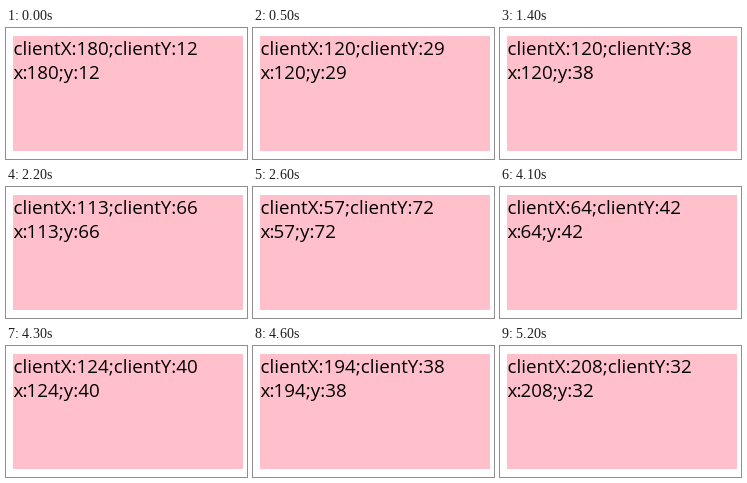
An HTML page that plays this animation: 241x131 px, repeating every 5800 ms.

```html
<!DOCTYPE html>
<html lang="en">
<head>
<meta charset="utf-8">
<title>Pointer coordinates</title>
<style>
  html, body { margin: 0; width: 100%; height: 100%; overflow: hidden; background: #fff; }
  svg { display: block; width: 100%; height: 100%; }
  text { font: 18.8px "Open Sans", "Noto Sans", sans-serif; fill: #000; }
  .tight { letter-spacing: -0.9px; }
</style>
</head>
<body>
<svg viewBox="0 0 241 131">
  <rect x="7" y="8" width="230" height="115" fill="pink"/>
  <text id="client" x="7.5" y="27"></text>
  <text x="7.5" y="51"><tspan class="tight">x:</tspan><tspan id="point"></tspan></text>
</svg>
<script>
const LOOP = 5800;
const STEP = 100;

// The pointer rests, then moves to a new spot in a few eased steps
const home = { x: 180, y: 12 };
const moves = [
  { start: 300, steps: 3, x: 120, y: 29 },
  { start: 1400, steps: 3, x: 119, y: 65 },
  { start: 2200, steps: 5, x: 57, y: 72 },
  { start: 3200, steps: 3, x: 54, y: 42 },
  { start: 4100, steps: 6, x: 194, y: 38 },
  { start: 5100, steps: 2, x: 208, y: 32 }
];

const client = document.getElementById("client");
const point = document.getElementById("point");

const ease = p => p * p * (3 - 2 * p);
const mix = (a, b, p) => Math.round(a + (b - a) * p);

function pointerAt(time) {
  const next = moves.findLastIndex(move => move.start <= time);
  if (next < 0) return home;
  const from = moves[next - 1] ?? home;
  const to = moves[next];
  const step = Math.floor((time - to.start) / STEP) + 1;
  const p = ease(Math.min(step / to.steps, 1));
  return { x: mix(from.x, to.x, p), y: mix(from.y, to.y, p) };
}

function render(time) {
  const { x, y } = pointerAt(time);
  client.textContent = `clientX:${x};clientY:${y}`;
  point.textContent = `${x};y:${y}`;
}

const origin = performance.now();

function tick() {
  render((performance.now() - origin) % LOOP);
  requestAnimationFrame(tick);
}

tick();
</script>
</body>
</html>
```
